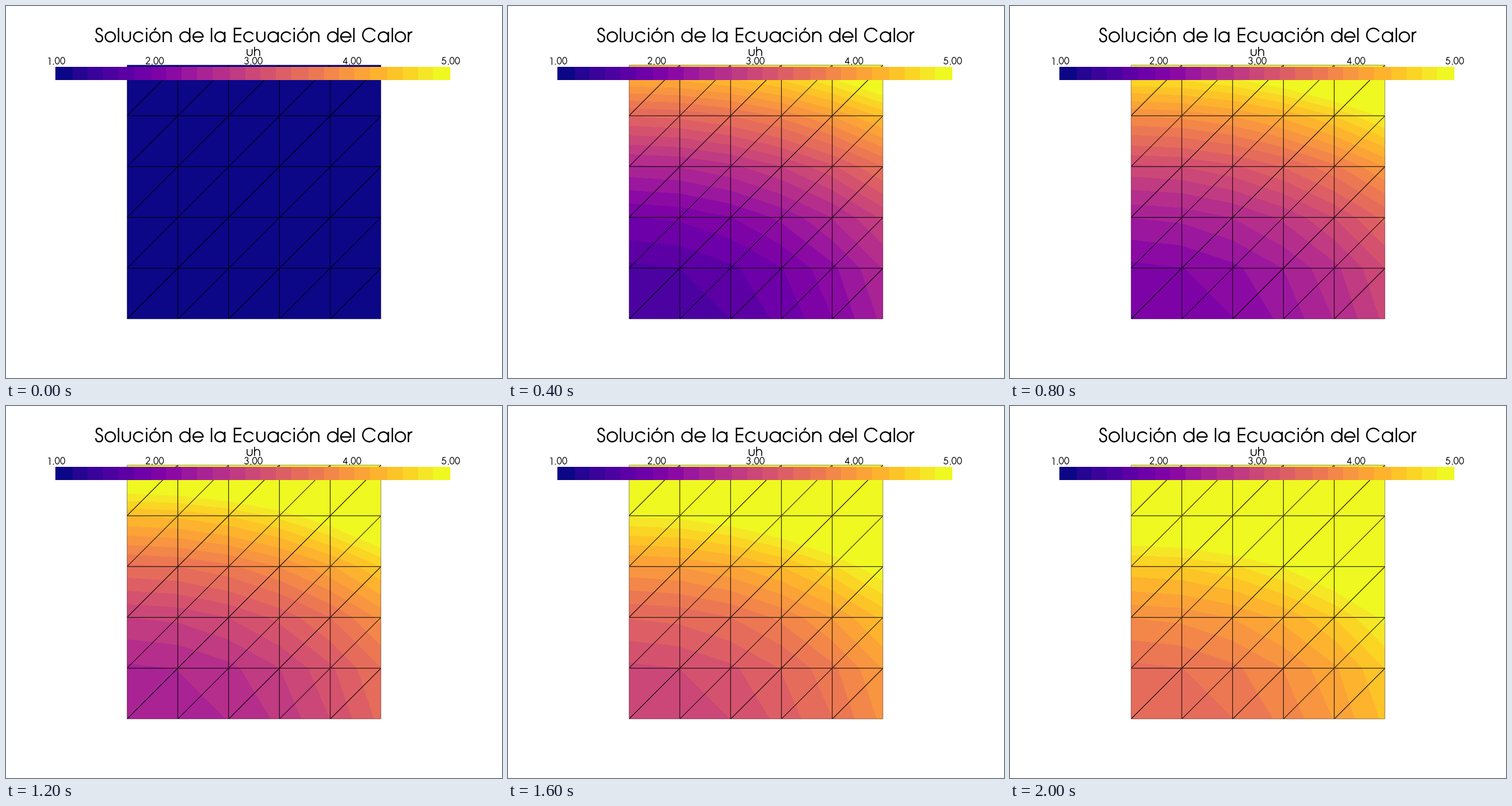
A matplotlib script for the animation above (2.1 s loop, 864 by 648 pixels).

```python
import numpy as np
import matplotlib.pyplot as plt
from matplotlib.animation import FuncAnimation
from matplotlib.collections import LineCollection
from matplotlib.path import Path

W, H, DPI = 864, 648, 100
STEPS, DT = 20, 0.1
ALPHA, BETA = 3.0, 1.2
LOW, HIGH = 1.0, 5.0
CELLS, SIDE = 5, 442.6
CELL = SIDE / CELLS
STEM = 73  # stroke width, 1/1000 em


# ---- geometric stroke lettering, units of 1/1000 em ----
def arc(cx, cy, rx, ry, a0, a1):
    a = np.radians(np.linspace(a0, a1, 60))
    return np.column_stack([cx + rx * np.cos(a), cy + ry * np.sin(a)])


def line(*pts):
    return np.array(pts, float)


def stem(x, top, bottom=0):
    return line((x, bottom), (x, top))


def join(*parts):
    return np.vstack(parts)


def bowl(cx, a0=0, a1=360):
    return arc(cx, 274, 255, 250, a0, a1)


def spline(*pts):
    codes = [Path.MOVETO] + [Path.CURVE4] * (len(pts) - 1)
    curve = Path(pts, codes).interpolated(1)
    return curve.to_polygons(closed_only=False)[0]


def arch(left, right):
    mid, r = (left + right) / 2, (right - left) / 2
    return join(arc(mid, 322, r, r, 180, 0), line((right, 0)))


S_CURVE = spline(
    (395, 565), (390, 660), (335, 715), (248, 715),
    (160, 715), (105, 650), (105, 570),
    (105, 470), (170, 430), (250, 395),
    (350, 352), (422, 310), (422, 205),
    (422, 90), (350, 24), (245, 24),
    (140, 24), (80, 90), (78, 205))

LETTERS = {
    " ": (277, []),
    "S": (498, [S_CURVE]),
    "E": (536, [line((489, 703), (117, 703), (117, 37), (489, 37)),
                line((117, 380), (480, 380))]),
    "C": (813, [arc(420, 370, 340, 346, 31, 329)]),
    "a": (683, [bowl(332), stem(585, 547)]),
    "c": (647, [bowl(329, 31, 329)]),
    "d": (685, [bowl(335), stem(588, 740)]),
    "e": (650, [bowl(329, 0, 331), line((74, 274), (620, 274))]),
    "h": (610, [stem(102, 740), arch(102, 506)]),
    "i": (200, [stem(100, 547), stem(100, 740, 640)]),
    "l": (200, [stem(100, 740)]),
    "n": (610, [stem(102, 547), arch(102, 504)]),
    "o": (655, [bowl(327)]),
    "ó": (655, [bowl(327), line((290, 605), (385, 745))]),
    "r": (301, [stem(102, 547), arc(285, 340, 183, 183, 180, 88)]),
    "u": (608, [join(line((102, 547)), arc(304, 226, 202, 202, 180, 360),
                     line((506, 547)))]),
}
DIGITS = {
    ".": (277, [stem(139, 85)]),
    "0": (554, [arc(277, 370, 211, 346, 0, 360)]),
    "1": (554, [line((150, 703), (318, 703), (318, 0))]),
    "2": (554, [join(arc(277, 525, 185, 191, 172, -38),
                     line((90, 37), (490, 37)))]),
    "3": (554, [arc(265, 552, 160, 164, 165, -90),
                arc(265, 206, 195, 182, 90, -165)]),
    "4": (554, [line((385, 0), (385, 690), (70, 185), (515, 185))]),
    "5": (554, [join(line((450, 703), (190, 703), (125, 375)),
                     arc(265, 240, 205, 216, 125, -165))]),
}
GLYPHS = {**LETTERS, **DIGITS}


def write(ax, text, cx, base, em):
    """Draw text centred on cx with its baseline at base."""
    k = em / 1000
    x = cx - k * sum(GLYPHS[ch][0] for ch in text) / 2
    strokes = []
    for ch in text:
        width, parts = GLYPHS[ch]
        strokes += [p * (k, -k) + (x, base) for p in parts]
        x += width * k
    ax.add_collection(LineCollection(
        strokes, colors="black", linewidths=STEM * k * 72 / DPI,
        capstyle="butt", joinstyle="miter", zorder=4))


# ---- heat field on a regular triangle mesh ----
lut = plt.colormaps["plasma"].resampled(25)(np.linspace(0, 1, 256))[:, :3]

x0, y0 = (W - SIDE) / 2, (H - SIDE) / 2
left, right = int(x0), int(x0 + SIDE) + 1
top, bottom = int(y0), int(y0 + SIDE) + 1
px = np.arange(left, right) + 0.5
py = np.arange(top, bottom) + 0.5
gx = (px[None, :] - x0) / CELL
gy = (y0 + SIDE - py[:, None]) / CELL

nodes = np.arange(CELLS + 1)
squares = (nodes / CELLS) ** 2
shape = (1 + np.interp(gx, nodes, squares)
         + ALPHA * np.interp(gy, nodes, squares))


def off_grid(v):
    return np.abs(v - np.round(v)) * CELL


def cover(g):
    return np.clip(0.5 + SIDE / 2 - np.abs(g * CELL - SIDE / 2), 0, 1)


gap = np.minimum(np.minimum(off_grid(gx), off_grid(gy)),
                 off_grid(gx - gy) / np.sqrt(2))
ink = np.clip(gap, 0, 1)[..., None]
inside = (cover(gx) * cover(gy))[..., None]


def render(step):
    # the solution is still zero before the first time step
    u = shape + BETA * DT * step if step else np.zeros_like(shape)
    index = np.floor((u - LOW) / (HIGH - LOW) * 256).astype(int)
    rgb = lut[np.clip(index, 0, 255)] * ink
    return 1 + (rgb - 1) * inside


fig = plt.figure(figsize=(W / DPI, H / DPI), dpi=DPI, facecolor="white")
ax = fig.add_axes([0, 0, 1, 1])
ax.axis("off")

mesh = ax.imshow(render(0), extent=(left, right, bottom, top),
                 interpolation="nearest", aspect="auto", zorder=1)
ax.imshow(lut[None], extent=(86, 774, 129, 106),
          interpolation="nearest", aspect="auto", zorder=2)

write(ax, "Solución de la Ecuación del Calor", 431, 63, 33.7)
write(ax, "uh", 431, 87, 21.6)
for i, value in enumerate(np.linspace(LOW, HIGH, 5)):
    write(ax, f"{value:.2f}", 87 + 171.9 * i, 101.5, 17)

ax.set_xlim(0, W)
ax.set_ylim(H, 0)


def update(step):
    mesh.set_data(render(step))
    return [mesh]


anim = FuncAnimation(fig, update, frames=STEPS + 1, interval=100,
                     repeat=True, repeat_delay=0)
plt.show()
```
